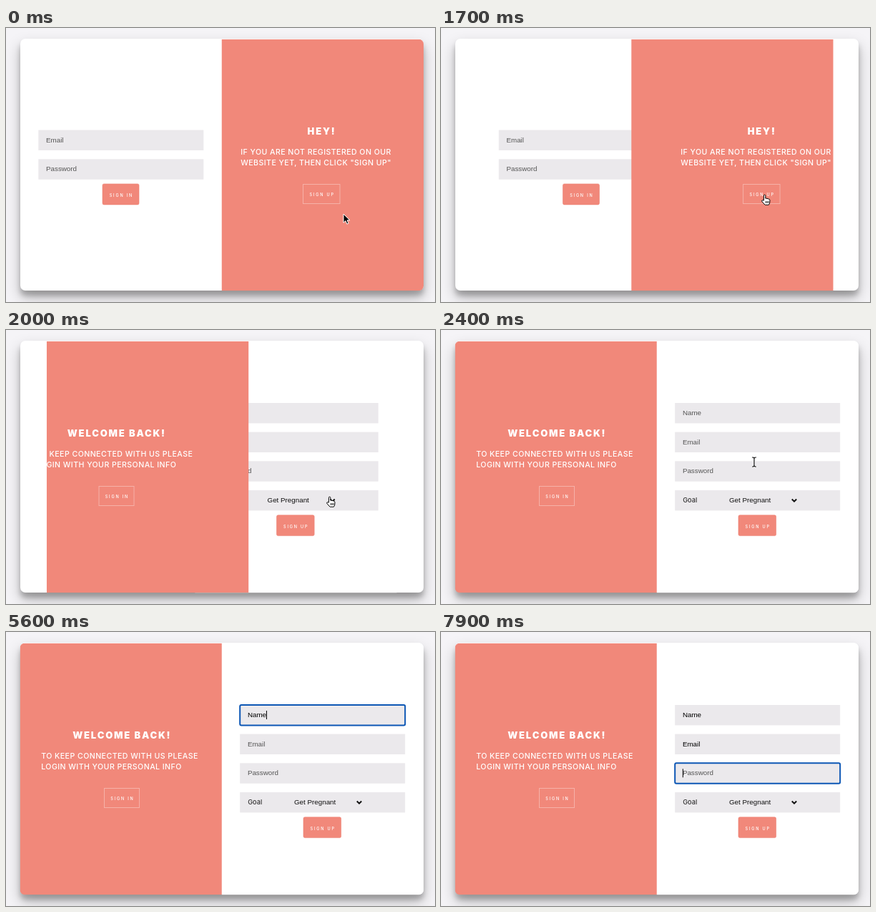
An HTML page that plays this animation: 600x383 px, repeating every 8 s.

```html
<!DOCTYPE html>
<html lang="en">
<head>
<meta charset="utf-8">
<title>Sign in / sign up slider</title>
<style>
  html, body { margin: 0; width: 100%; height: 100%; overflow: hidden; background: #f5f4f7; }
  #card {
    position: absolute; left: 19.5px; top: 15.4px; width: 564.5px; height: 352px;
    border-radius: 7px; background: #fff;
    box-shadow: 0 10px 20px rgba(0,0,0,.25), 0 7px 7px rgba(0,0,0,.22);
  }
  svg { position: absolute; left: 0; top: 0; }
  text { white-space: pre; }
  .arial { font: 9.8px "Liberation Sans", Arial, sans-serif; fill: #555; }
  .title { font: 900 13px Inter, sans-serif; letter-spacing: 1.8px; text-anchor: middle; fill: #fff; }
  .body { font: 500 10.6px Inter, sans-serif; letter-spacing: .44px; fill: #fff; }
  .label { font: 500 5.6px Inter, sans-serif; letter-spacing: 1.8px; text-anchor: middle; fill: #fff; }
  .goal { font: 500 9.2px Inter, sans-serif; fill: #333; }
  .menu { font: 500 10.7px Inter, sans-serif; fill: #f0f0f0; }
</style>
</head>
<body>
<div id="card"></div>
<svg id="stage" width="600" height="383" viewBox="0 0 600 383"></svg>
<script>
const PINK = '#f1887a', HALF = 282.25, LEFT = 19.5, MID = LEFT + HALF, TOP = 15.4, HEIGHT = 352;
const ROWS = [102, 142.6, 183.3, 224], ROW_H = 28.4, FIELD_X = 327.2, FIELD_W = 231;

const rect = (x, y, w, h, attrs) => `<rect x="${x}" y="${y}" width="${w}" height="${h}" ${attrs}/>`;
const text = (cls, x, y, s, attrs = '') => `<text class="${cls}" x="${x}" y="${y}" ${attrs}>${s}</text>`;
const field = (x, y, s, id = '') =>
  rect(x, y, FIELD_W, ROW_H, 'fill="#ebe9ec"') +
  text('arial', x + 10.7, y + 17.1, s, id && `id="${id}"`);
const button = (x, y, w, h, s, attrs) =>
  rect(x, y, w, h, attrs) + text('label', x + w / 2 + .9, y + h / 2 + 3.4, s);
const solid = `rx="2" fill="${PINK}" stroke="#ec8073" stroke-width=".6"`;
const ghost = 'fill="none" stroke="#fff" stroke-opacity=".34"';
const panel = (id, x, cx, title, lines, btn) => `<g id="${id}">` +
  text('title', cx, 148.8, title) +
  lines.map((s, i) => text('body', x, 177.4 + i * 14.6, s)).join('') + btn + '</g>';

const $ = id => document.getElementById(id);

$('stage').innerHTML = `
  <clipPath id="round">${rect(LEFT, TOP, 2 * HALF, HEIGHT, 'rx="7"')}</clipPath>
  <clipPath id="window">${rect(MID, TOP, HALF, HEIGHT, 'id="slide"')}</clipPath>
  <g clip-path="url(#round)">
    <g id="signIn">
      ${field(45.3, ROWS[1], 'Email')}${field(45.3, ROWS[2], 'Password')}
      ${button(135, 217.9, 51, 29, 'SIGN IN', solid)}
    </g>
    <g id="signUp">
      ${rect(MID, TOP, HALF, HEIGHT, 'fill="#fff"')}
      ${field(FIELD_X, ROWS[0], 'Name', 'name')}
      ${field(FIELD_X, ROWS[1], 'Email', 'email')}
      ${field(FIELD_X, ROWS[2], 'Password', 'password')}
      ${field(FIELD_X, ROWS[3], '')}
      ${text('goal', 338.2, 241.2, 'Goal')}
      ${text('arial', 403, 241.2, 'Get Pregnant', 'style="fill:#111"')}
      <path d="M490.8 236.5l3.2 3.2l3.2-3.2" fill="none" stroke="#111" stroke-width="2"/>
      ${button(416, 258.8, 52.6, 28.8, 'SIGN UP', solid)}
    </g>
    <g clip-path="url(#window)">
      ${rect(LEFT, TOP, 2 * HALF, HEIGHT, `fill="${PINK}"`)}
      ${panel('hello', 49.2, 162.3, 'WELCOME BACK!',
        ['TO KEEP CONNECTED WITH US PLEASE', 'LOGIN WITH YOUR PERSONAL INFO'],
        button(137.5, 218.5, 49, 27, 'SIGN IN', ghost))}
      ${panel('hey', 328.2, 441.6, 'HEY!',
        ['IF YOU ARE NOT REGISTERED ON OUR', 'WEBSITE YET, THEN CLICK "SIGN UP"'],
        button(415.5, 218.5, 51.5, 27, 'SIGN UP', ghost))}
    </g>
  </g>
  ${rect(FIELD_X, 0, FIELD_W, ROW_H, 'id="ring" rx="2" fill="none" stroke="#0d57b5" stroke-width="2"')}
  ${rect(0, 0, 1, 12, 'id="caret"')}
  <g id="menu">
    ${rect(327, 133, 231.5, 77, 'rx="3" fill="#000" opacity=".15"')}
    ${rect(326.8, 132, 232, 76, 'rx="3" fill="#222426"')}
    ${rect(327, 174.5, 231.5, 1, 'fill="#313335"')}
    ${text('menu', 337, 157, 'Torvashen Mireld')}${text('menu', 337, 195.5, 'Управление...')}
  </g>
  <g id="cursor">
    <path id="arrow" d="M0 0V12.2L2.9 9.5L4.9 14L7 13.1L5.1 8.8H9Z" stroke="#fff"/>
    <path id="hand" fill="#fff" stroke="#000" d="M-1 8V1.2a1.2 1.2 0 0 1 2.4 0V5q1.3-.8 2.2.4q1.4-.6 2.1.5q1.6-.2 1.8 1.3V10q0 2-1.5 4H.8Q-1.5 12-3.6 9Q-4 7.5-2.6 7.4Q-1.6 7.6-1 8ZM2 9v2.4M3.8 9v2.4M5.6 9v2.4"/>
    <g id="beam" fill="none" stroke-linecap="round">
      ${['#fff" stroke-width="2.4', '#111" stroke-width="1.2'].map(s =>
        `<path stroke="${s}" d="M-2.5-6.5Q0-6.5 0-5Q0-6.5 2.5-6.5M0-5V5M-2.5 6.5Q0 6.5 0 5Q0 6.5 2.5 6.5"/>`).join('')}
    </g>
  </g>`;

const clamp = v => Math.max(0, Math.min(1, v));
const show = (id, on) => $(id).style.display = on ? '' : 'none';
const move = (id, x, y = 0) => $(id).setAttribute('transform', `translate(${x} ${y})`);

// CSS ease-in-out: cubic-bezier(.42, 0, .58, 1)
function easeInOut(x) {
  let lo = 0, hi = 1, s;
  for (let i = 0; i < 24; i++) {
    s = (lo + hi) / 2;
    const r = 1 - s;
    if (1.26 * s * r * r + 1.74 * s * s * r + s * s * s < x) lo = s; else hi = s;
  }
  return s * s * (3 - 2 * s);
}

// Focus time of each input and the time of each key press
const inputs = [
  { id: 'name', word: 'Name', focus: 3800, keys: [4800, 5200, 5500, 5600] },
  { id: 'email', word: 'Email', focus: 5800, keys: [6500, 6800, 6900, 7000, 7200] },
  { id: 'password', word: 'Password', focus: 7700, keys: [] }
];

// Pointer stops: time, x, y
const stops = [[0, 472, 260], [100, 472, 260], [500, 452.4, 233.2], [2150, 452.4, 233.2],
  [2400, 438, 184.5], [2450, 438, 184.5], [3200, 398, 113]];

function pointer(t) {
  let i = stops.length - 1;
  while (stops[i][0] > t) i--;
  const a = stops[i], b = stops[i + 1] || a;
  const u = a === b ? 0 : (t - a[0]) / (b[0] - a[0]), k = u * u * (3 - 2 * u);
  return [a[1] + (b[1] - a[1]) * k, a[2] + (b[2] - a[2]) * k];
}

function drawForms(t) {
  const p = easeInOut(clamp((t - 1552) / 600));
  $('slide').setAttribute('x', MID - HALF * p);
  move('signIn', HALF * p);
  move('signUp', HALF * (p - 1));
  show('signUp', p >= .5);
  move('hello', HALF * .2 * (p - 1));
  move('hey', HALF * .2 * p);
}

function drawInputs(t) {
  let active = -1, caretOn = false;
  inputs.forEach((f, i) => {
    const n = f.keys.filter(k => k <= t).length, el = $(f.id);
    el.textContent = n ? f.word.slice(0, n) : f.word;
    el.style.fill = n ? '#000' : '';
    if (t < f.focus) return;
    active = i;
    caretOn = (t - (n ? f.keys[n - 1] : f.focus)) % 1000 < 500;
    $('caret').setAttribute('x', FIELD_X + 10.6 + (n ? el.getComputedTextLength() : 0));
  });
  show('ring', active >= 0);
  show('caret', caretOn);
  show('menu', t >= 3800 && t < 4800);
  if (active >= 0) {
    $('ring').setAttribute('y', ROWS[active]);
    $('caret').setAttribute('y', ROWS[active] + 8);
  }
}

function drawCursor(t) {
  const [x, y] = pointer(t);
  const overButton = t <= 2150 && y < 246;
  const overField = t > 2150 && ROWS.slice(0, 3).some(r => y >= r && y <= r + ROW_H);
  move('cursor', x, y);
  show('cursor', t < 4800);
  show('hand', overButton);
  show('beam', overField);
  show('arrow', !overButton && !overField);
}

const start = performance.now();
function draw() {
  // Time advances in steps of 100 ms
  const t = Math.floor((performance.now() - start) % 8000 / 100) * 100;
  drawForms(t);
  drawInputs(t);
  drawCursor(t);
  requestAnimationFrame(draw);
}
draw();
</script>
</body>
</html>
```
